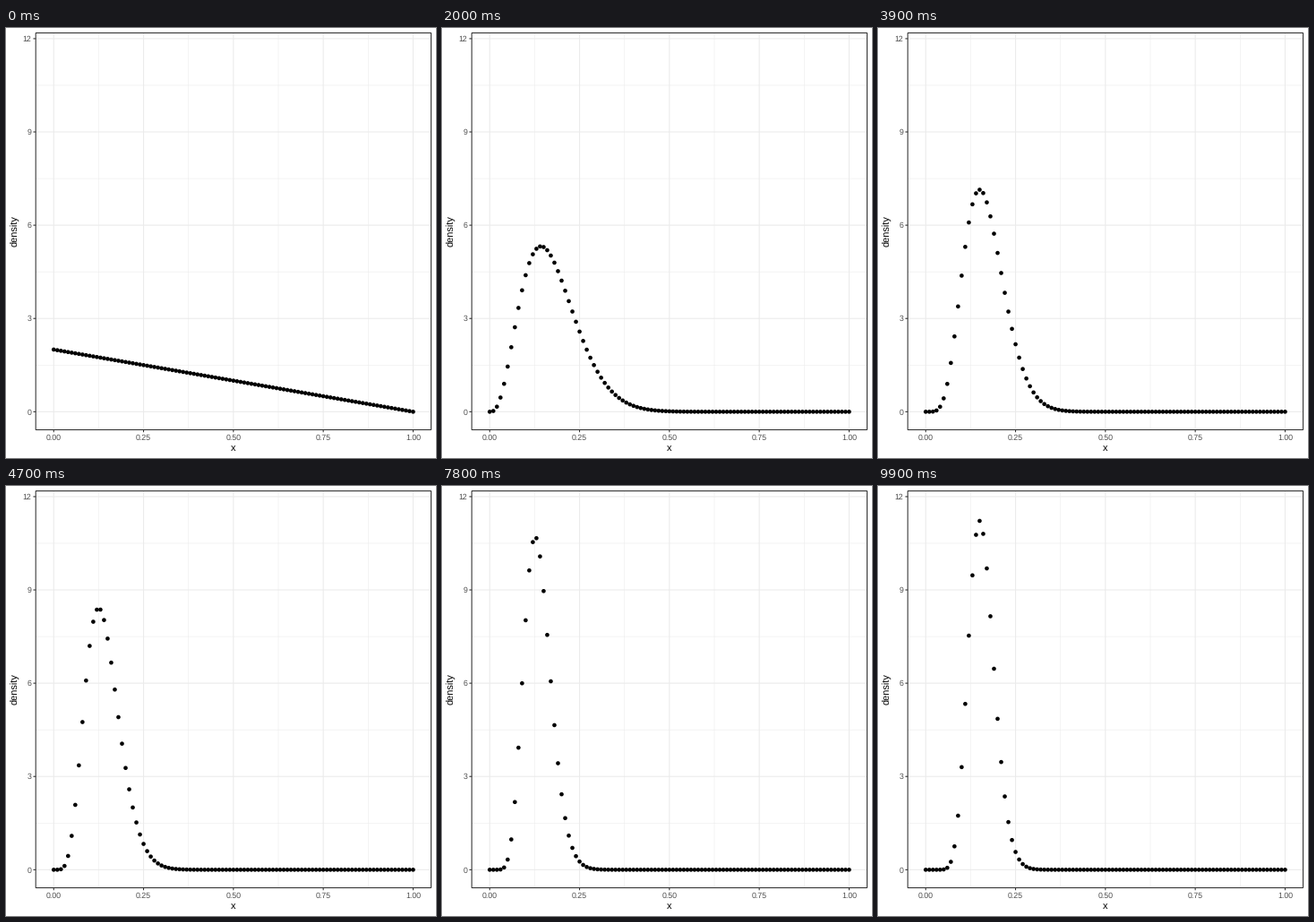
Animation of 480 by 480 pixels, one loop 10 s. Source, as a matplotlib script:

```python
"""Posterior density of a proportion, updated one trial at a time."""
from math import comb

import matplotlib.pyplot as plt
import numpy as np
from matplotlib.animation import FuncAnimation

SIZE, DPI = 480, 72
TRIALS, INTERVAL = 100, 100
SUCCESSES = (8, 14, 18, 23, 33, 39, 51, 57, 69, 73, 80, 88, 95, 97, 99)

LEFT, RIGHT, TOP, BOTTOM = 33.2, 474.5, 5.5, 448.5
MAX_DENSITY = 11.604
GRID, DARK, LABEL = "#ebebeb", "#333333", "#4d4d4d"
LINE, TICK, GAP = 1.07, 2.75, 4.95
DOT = 4.62

plt.rcParams["font.family"] = "Liberation Sans"
plt.rcParams["text.hinting"] = "none"

xs = np.linspace(0, 1, 101)


def px(x):
    """Stage x of a data value, with 5 % padding on both sides."""
    return LEFT + (RIGHT - LEFT) * (x + 0.05) / 1.1


def py(y):
    return BOTTOM - (BOTTOM - TOP) * (y / MAX_DENSITY + 0.05) / 1.1


def posterior(n):
    """Beta density after n trials, starting from a flat prior."""
    s = sum(t <= n for t in SUCCESSES)
    return (n + 1) * comb(n, s) * xs**s * (1 - xs) ** (n - s)


fig = plt.figure(figsize=(SIZE / DPI, SIZE / DPI), dpi=DPI, facecolor="white")
ax = fig.add_axes([0, 0, 1, 1])
ax.set(xlim=(0, SIZE), ylim=(SIZE, 0))
ax.axis("off")


def line(x, y, color, width=LINE, z=1):
    ax.plot(x, y, color=color, lw=width, zorder=z, snap=False,
            solid_capstyle="butt", solid_joinstyle="miter")


def vgrid(x, width, z):
    line([px(x)] * 2, [TOP, BOTTOM], GRID, width, z)


def hgrid(y, width, z):
    line([LEFT, RIGHT], [py(y)] * 2, GRID, width, z)


for x in np.arange(0.125, 1, 0.25):
    vgrid(x, LINE / 2, 1)
for y in np.arange(1.5, 12, 3):
    hgrid(y, LINE / 2, 1)

for x in np.arange(0, 1.1, 0.25):
    vgrid(x, LINE, 2)
    line([px(x)] * 2, [BOTTOM, BOTTOM + TICK], DARK)
    ax.text(px(x), BOTTOM + GAP + 6.3, f"{x:.2f}", size=8.8, color=LABEL,
            ha="center", va="baseline")
for y in range(0, 13, 3):
    hgrid(y, LINE, 2)
    line([LEFT - TICK, LEFT], [py(y)] * 2, DARK)
    ax.text(LEFT - GAP, py(y) + 3.15, str(y), size=8.8, color=LABEL,
            ha="right", va="baseline")

line([LEFT, RIGHT, RIGHT, LEFT, LEFT], [TOP, TOP, BOTTOM, BOTTOM, TOP],
     DARK, z=5)
ax.text((LEFT + RIGHT) / 2, 472.3, "x", size=11, ha="center", va="baseline")
ax.text(13.4, (TOP + BOTTOM) / 2, "density", size=11, rotation=90,
        rotation_mode="anchor", ha="center", va="baseline")

# One size per dot keeps sub-pixel positions.
dots = ax.scatter(px(xs), py(posterior(1)), s=np.full(xs.size, DOT**2),
                  c="black", linewidths=0, zorder=4)


def update(i):
    dots.set_offsets(np.column_stack([px(xs), py(posterior(i + 1))]))
    return (dots,)


anim = FuncAnimation(fig, update, frames=TRIALS, interval=INTERVAL,
                     repeat=True, repeat_delay=0)
plt.show()
```
